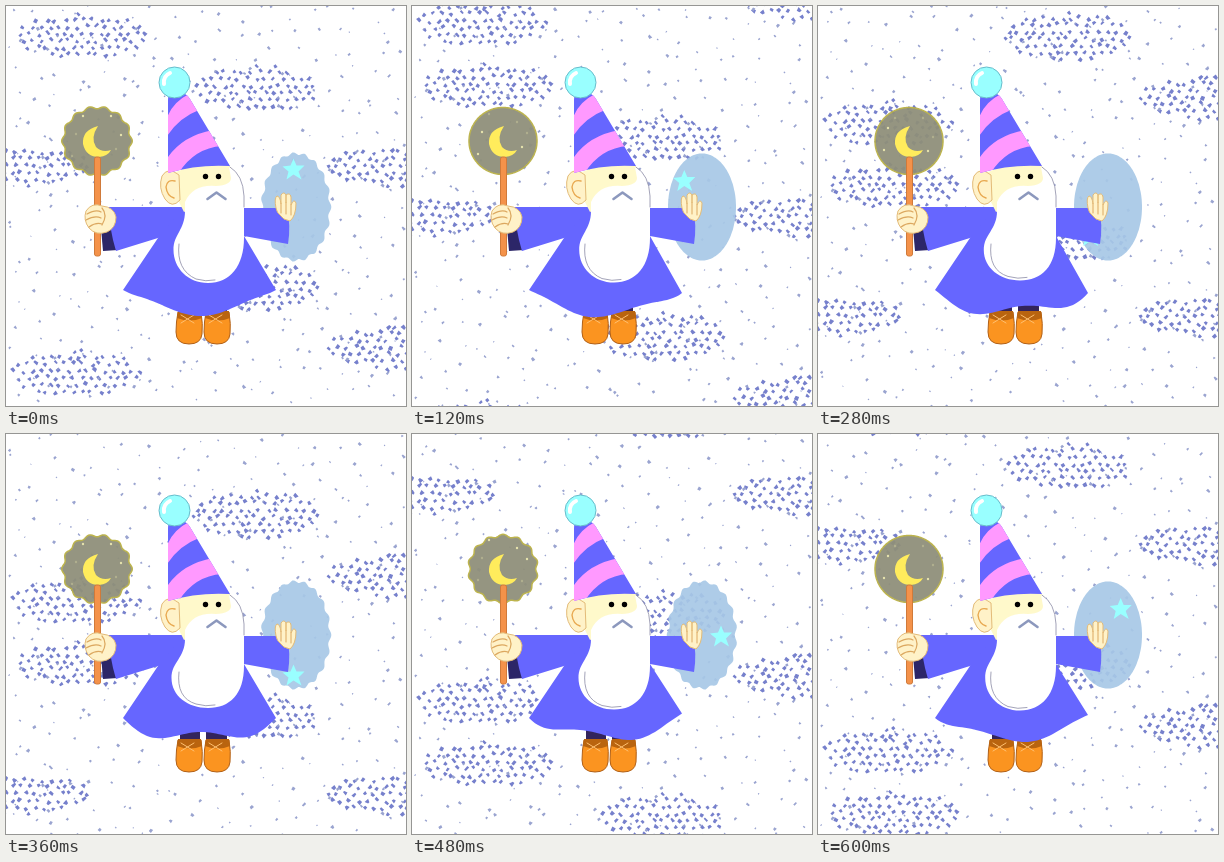
Animation of 400 by 400 pixels, one loop 640 ms. Source, as an HTML page:

```html
<!DOCTYPE html>
<html lang="en">
<head>
<meta charset="utf-8">
<title>Wizard</title>
<style>
  html, body { margin: 0; width: 100%; height: 100%; overflow: hidden; background: #fff; }
  svg { display: block; width: 100vw; height: 100vh; }
  .robe { fill: #66f; }
  .skin { fill: #fff2c8; stroke: #e3bb78; stroke-width: 1; }
  .line { fill: none; stroke-linecap: round; stroke-linejoin: round; }
</style>
</head>
<body>
<svg viewBox="0 0 400 400">
  <defs>
    <clipPath id="hat"><path d="M162 167V94Q162 86 171 86Q180 86 184 93L224 160Q192 158 162 167Z"/></clipPath>
    <g id="boot">
      <path d="M172 306H195Q197 318 196 328Q195 338 183 338Q170 338 170 326Q170 316 172 306Z" fill="#fb9420" stroke="#b06018"/>
      <path d="M172 305H195L196 312Q184 317 171 312Z" fill="#b9640f"/>
      <path class="line" d="M175 309L188 317M188 309L175 317" stroke="#ffc070"/>
    </g>
    <g id="tile"><path id="dots" fill="#7680cc"/><path id="flakes" fill="#9aa4d0"/></g>
  </defs>

  <g id="sky"><use href="#tile"/><use href="#tile" y="-400"/></g>

  <path id="orb" fill="#a8c8e6" opacity=".92"/>
  <path id="star" fill="#9ff" d="M0 -11L3 -4L11 -4L5 2L8 10L0 5L-7 10L-5 2L-11 -3L-3 -4Z"/>

  <path d="M174 295H194V309H174ZM200 295H221V309H200Z" fill="#33245c"/>
  <use href="#boot"/><use href="#boot" x="28"/>

  <path d="M95 222L105 217L112 244L97 245Z" fill="#2c2668"/>
  <path class="robe" d="M103 201H185V224L152 232L110 245Q103 222 103 201Z"/>
  <path class="robe" d="M230 202H281Q285 220 282 238L238 230Z"/>
  <path id="robe" class="robe"/>

  <path id="disc" fill="#8f8f7a" stroke="#b9b044" stroke-width="1.5" opacity=".94"/>
  <g id="sparks" fill="#eeeab0"></g>
  <path d="M92 120Q76 124 77 138Q80 151 93 151Q102 150 105 144Q96 147 90 141Q84 132 92 120Z" fill="#ffec5c"/>
  <rect x="88.5" y="151" width="6" height="99" rx="2" fill="#f4924a" stroke="#d07a3a"/>
  <path class="skin" d="M80 205Q86 196 96 200Q108 201 110 211Q110 222 101 226Q90 230 83 222Q77 214 80 205Z"/>
  <path class="line" d="M81 208Q90 203 95 206M80 214Q89 209 95 212M83 221Q90 216 96 218M96 202Q102 209 96 219" stroke="#dca860" stroke-width="1.2"/>

  <path class="skin" d="M270 202Q268 192 271 190Q274 190 275 198V189Q278 185 280 189V197V189Q284 186 285 191V199Q288 192 290 197Q290 210 284 215Q277 214 274 209Q271 207 270 202Z"/>
  <path class="line" d="M275 198V207M280 197V208M285 199V209" stroke="#dca860"/>

  <path d="M170 166Q195 156 223 159Q231 168 231 184L178 206L172 194Z" fill="#fff9cb"/>
  <path class="skin" d="M173 169Q162 160 156 170Q152 182 159 193Q166 203 174 194Z"/>
  <path class="line" d="M169 175Q161 173 160 181Q161 190 168 192" stroke="#e8a850" stroke-width="1.4"/>
  <path id="beard" fill="#fff"/>
  <path id="fold" class="line" stroke="#8c8ca6" stroke-width=".8"/>
  <path class="line" d="M224 161Q237 169 238 190V201" stroke="#8c8ca6" stroke-width=".8"/>
  <circle cx="199.500" cy="170.500" r="2.700"/>
  <circle cx="212.500" cy="170.500" r="2.700"/>
  <path class="line" d="M201.500 193L210.500 186.500L219.500 193" stroke="#8c98bd" stroke-width="2.600"/>

  <g clip-path="url(#hat)">
    <path class="robe" d="M155 80H230V170H155Z"/>
    <path d="M160 115Q165 97 183 88L193 104Q172 112 160 132ZM160 154Q175 130 207 124L216 140Q188 142 172 168H160Z" fill="#f9f"/>
  </g>
  <circle cx="168.500" cy="76.500" r="15.500" fill="#9ff" stroke="#68bccb"/>
  <path class="line" d="M158 78Q157 70 164 67" stroke="#fff" stroke-width="4"/>
</svg>

<script>
const $ = id => document.getElementById(id);
const LOOP = 640, STEPS = 8, TAU = Math.PI * 2;

let seed = 11;
const rand = () => (seed = (seed * 16807) % 2147483647) / 2147483647;
const jitter = n => (rand() - .5) * n;
const fix = n => n.toFixed(1);

// Small four-sided fleck centred on x, y
const fleck = (x, y, r) =>
  `M${fix(x - r)} ${fix(y + jitter(r))}L${fix(x + jitter(r))} ${fix(y - r)}L${fix(x + r)} ${fix(y + jitter(r))}L${fix(x + jitter(r))} ${fix(y + r)}Z`;

function cloud(cx, cy, rx, ry) {
  let d = '';
  for (let y = -ry, row = 0; y <= ry; y += 7, row++)
    for (let x = -rx + (row % 2) * 4.5; x <= rx; x += 9) {
      const px = x + jitter(4), py = y + jitter(4);
      if ((px / rx) ** 2 + (py / ry) ** 2 < 1) d += fleck(cx + px, cy + py, 2 + rand() * .7);
    }
  return d;
}

function flakes() {
  let d = '';
  for (let y = 8; y < 400; y += 20)
    for (let x = 10; x < 400; x += 20)
      d += fleck(x + jitter(18), y + jitter(18), .8 + rand() * 1.4);
  return d;
}

const clouds = [
  [75, 30, 66, 23], [250, 83, 63, 24], [0, 160, 84, 21], [400, 160, 83, 21],
  [250, 280, 64, 25], [400, 343, 82, 23], [70, 367, 66, 23]
];
$('dots').setAttribute('d', clouds.map(c => cloud(...c)).join(''));
$('flakes').setAttribute('d', flakes());

const outline = pts => 'M' + pts.map(p => p.map(fix).join(' ')).join('L');

function bubble(cx, cy, rx, ry, lobes, amp) {
  const pts = [];
  for (let i = 0; i < 180; i++) {
    const a = i / 180 * TAU, bump = amp * Math.cos(lobes * a);
    pts.push([cx + (rx + bump) * Math.cos(a), cy + (ry + bump) * Math.sin(a)]);
  }
  return outline(pts) + 'Z';
}

// The hem swings as a wave that runs from right to left, and its right end tilts
function robe(turn) {
  const hem = [];
  for (let x = 270; x >= 117; x -= 3) {
    const u = (x - 193.5) / 76.5;
    const swing = 6 * (1 - u ** 4) * Math.cos(turn - (195 - x) / 15 * TAU / STEPS);
    const tilt = 2.2 * (1 + u) * Math.sin(turn);
    hem.push([x, 284 + 20 * (1 - Math.abs(u) ** 3) + swing + tilt]);
  }
  return outline([[178, 201], [236, 202], [238, 230], ...hem, [152, 232]]) + 'Z';
}

const sparks = [[66, 150], [77, 112], [110, 147], [105, 116], [70, 128], [115, 131]].map(([x, y]) => {
  const c = document.createElementNS('http://www.w3.org/2000/svg', 'circle');
  c.setAttribute('r', 1.2);
  c.setAttribute('cx', x);
  $('sparks').append(c);
  return { c, y };
});

let shown = -1;
function draw(step) {
  const turn = step / STEPS * TAU;
  const bump = 1.3 * Math.cos(step * Math.PI / 2);
  $('sky').setAttribute('transform', `translate(0 ${step * 50})`);
  $('orb').setAttribute('d', bubble(290, 201, 34, 53.5, 19, bump));
  $('disc').setAttribute('d', bubble(91, 135, 34, 33.5, 14, bump));
  $('star').setAttribute('transform',
    `translate(${fix(287.5 - 21.5 * Math.sin(turn))} ${fix(202.5 - 39 * Math.cos(turn))})`);
  $('robe').setAttribute('d', robe(turn));

  const low = 275.5 + 1.5 * Math.cos(turn), left = 166.5 + Math.cos(turn);
  $('beard').setAttribute('d',
    `M223 161Q237 169 238 190V232C238 260 224 ${low} 202 ${low}C182 ${low} ${left} 262 ${left} 244C${left} 228 179 224 179 205V196Q187 178 210 180Q225 179 225 172Z`);
  $('fold').setAttribute('d', `M173 238Q170 264 190 ${low - 4}Q200 ${low - 1} 209 ${low - 3}`);

  sparks.forEach(({ c, y }, i) => {
    c.setAttribute('cy', y - (step + i) % 4 * 2);
    c.setAttribute('opacity', (step + i) % 2 ? .9 : .3);
  });
}

function tick() {
  const step = Math.floor(performance.now() % LOOP / LOOP * STEPS);
  if (step !== shown) draw(shown = step);
  requestAnimationFrame(tick);
}
tick();
</script>
</body>
</html>
```
